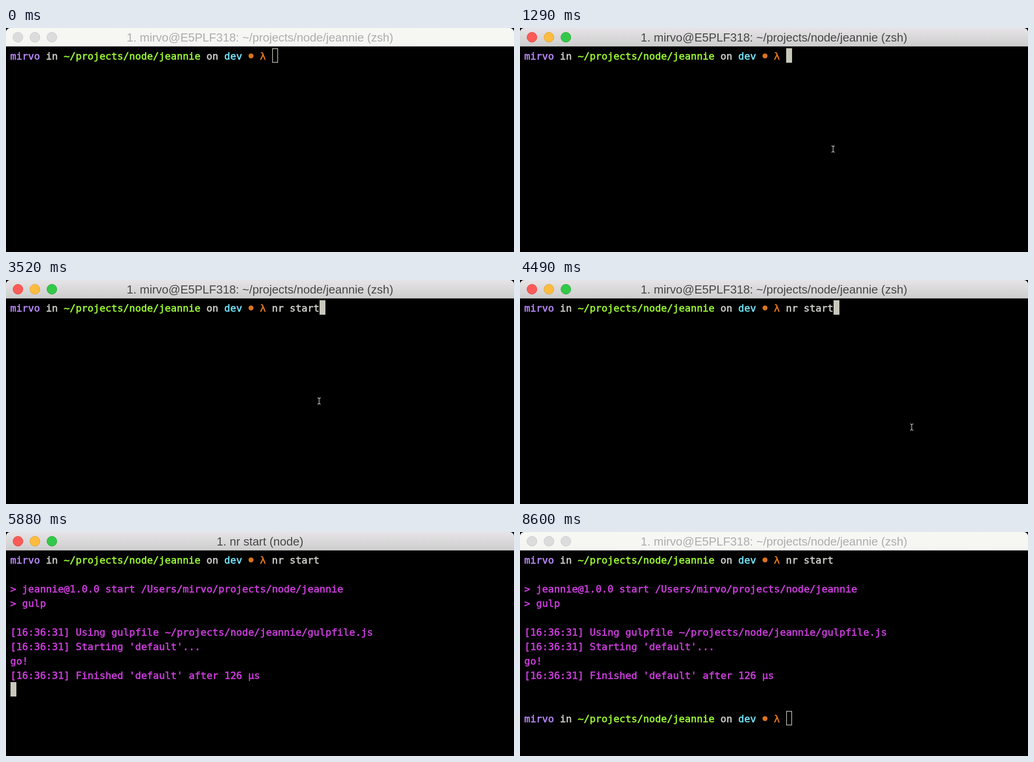
An HTML page with a canvas that plays this animation: 1126x497 px, repeating every 8.81 s.

```html
<!DOCTYPE html>
<html lang="en">
<head>
<meta charset="utf-8">
<title>Terminal</title>
<style>
html, body { margin: 0; width: 100%; height: 100%; overflow: hidden; background: #000; }
canvas { display: block; }
</style>
</head>
<body>
<canvas id="stage" width="1126" height="497"></canvas>
<script>
const ctx = document.getElementById('stage').getContext('2d');
const LOOP = 8810, CELL = 13.175, ROW = 32, LEFT = 9.5, TOP = 45;
const USER = 'mirvo', HOST = 'E5PLF318', PROJECT = '~/projects/node/jeannie', COMMAND = 'nr start';
const GREY = '#c9c9c4', ORANGE = '#dc741c', MAGENTA = '#c83cd8';

const FOCUS = 1250, ENTER = 5080, DONE = 5990, BLUR = 6360;
const keyTimes = [1990, 2120, 2250, 2400, 2550, 2690, 2850, 3020];

// [time, row, text]
const output = [
  [5530, 2, `> jeannie@1.0.0 start /Users/${USER}/projects/node/jeannie`],
  [5530, 3, '> gulp'],
  [5800, 5, `[16:36:31] Using gulpfile ${PROJECT}/gulpfile.js`],
  [5800, 6, "[16:36:31] Starting 'default'..."],
  [5800, 7, 'go!'],
  [5800, 8, "[16:36:31] Finished 'default' after 126 µs"]
];

// A thin outline gives the text its semi-bold weight.
function write(text, col, row, color) {
  const x = LEFT + col * CELL, y = TOP + 25 + row * ROW;
  ctx.fillStyle = ctx.strokeStyle = color;
  ctx.lineWidth = 0.8;
  ctx.lineJoin = 'round';
  ctx.fillText(text, x, y);
  ctx.strokeText(text, x, y);
}

function disc(x, y, r, fill, stroke) {
  ctx.beginPath();
  ctx.arc(x, y, r, 0, Math.PI * 2);
  ctx.fillStyle = fill;
  ctx.fill();
  if (stroke) {
    ctx.strokeStyle = stroke;
    ctx.lineWidth = 1;
    ctx.stroke();
  }
}

function titleBar(title, active) {
  const shade = ctx.createLinearGradient(0, 0, 0, 41);
  shade.addColorStop(0, active ? '#e6e4e6' : '#f7f7f4');
  shade.addColorStop(1, active ? '#cecdce' : '#f5f5f2');
  ctx.fillStyle = shade;
  ctx.beginPath();
  ctx.roundRect(0, 0, 1126, 41, [9, 9, 0, 0]);
  ctx.fill();
  ctx.fillStyle = active ? '#b4b4b4' : '#d2d2d2';
  ctx.fillRect(0, 40, 1126, 1);

  const lights = [['#fc5b57', '#df4744'], ['#fdbc40', '#de9f34'], ['#34c84a', '#27aa35']];
  lights.forEach(([fill, edge], i) =>
    disc(26.5 + i * 37.6, 20.5, 11, active ? fill : '#dcdcdc', active ? edge : '#c8c8c8'));

  ctx.font = '26px "Liberation Sans", Arial, sans-serif';
  ctx.textAlign = 'center';
  ctx.fillStyle = active ? '#474747' : '#adadad';
  ctx.fillText(title, 563, 30);
}

function prompt(row) {
  write(USER, 0, row, '#b483f4');
  write('in', 6, row, GREY);
  write(PROJECT, 9, row, '#98f232');
  write('on', 33, row, GREY);
  write('dev', 36, row, '#70def2');
  disc(LEFT + 40.5 * CELL, TOP + 17 + row * ROW, 5.5, ORANGE);
  write('λ', 42, row, ORANGE);
}

function cursor(col, row, active) {
  const x = Math.ceil(LEFT + col * CELL), y = TOP + row * ROW;
  ctx.fillStyle = ctx.strokeStyle = '#c8c8bc';
  if (active) {
    ctx.fillRect(x, y, 13, ROW);
  } else {
    ctx.lineWidth = 1.5;
    ctx.strokeRect(x + 0.75, y + 0.75, 11.5, ROW - 1.5);
  }
}

function ease(t, start, end) {
  const p = Math.min(1, Math.max(0, (t - start) / (end - start)));
  return p * p * (3 - 2 * p);
}

function pointer(t) {
  if (t < 730 || t > 4810) return;
  const enter = 1 - ease(t, 730, 1250), leave = ease(t, 4250, 4810);
  ctx.save();
  ctx.translate(694 + 440 * (enter + leave), 268.5 + 64 * enter + 146 * leave);
  ctx.strokeStyle = '#d8d8d8';
  ctx.lineWidth = 1.3;
  ctx.beginPath();
  ctx.moveTo(-3.5, -7);
  ctx.quadraticCurveTo(0, -7, 0, -4);
  ctx.quadraticCurveTo(0, -7, 3.5, -7);
  ctx.moveTo(0, -4);
  ctx.lineTo(0, 4);
  ctx.moveTo(-3.5, 7);
  ctx.quadraticCurveTo(0, 7, 0, 4);
  ctx.quadraticCurveTo(0, 7, 3.5, 7);
  ctx.stroke();
  ctx.restore();
}

function draw(t) {
  const active = t >= FOCUS && t < BLUR;
  const running = t >= ENTER && t < DONE;
  const typed = keyTimes.filter(time => t >= time).length;
  const lines = output.filter(([time]) => t >= time);

  ctx.fillStyle = '#000';
  ctx.fillRect(0, 0, 1126, 497);
  titleBar(running ? '1. nr start (node)' : `1. ${USER}@${HOST}: ${PROJECT} (zsh)`, active);

  ctx.font = '21.9px "DejaVu Sans Mono", monospace';
  ctx.textAlign = 'left';
  prompt(0);
  write(COMMAND.slice(0, typed), 44, 0, GREY);
  for (const [, row, text] of lines) write(text, 0, row, MAGENTA);

  if (t >= DONE) {
    prompt(11);
    cursor(44, 11, active);
  } else if (running) {
    cursor(0, lines.length ? lines[lines.length - 1][1] + 1 : 1, active);
  } else {
    cursor(44 + typed, 0, active);
  }
  pointer(t);
}

const start = performance.now();
function frame() {
  draw((performance.now() - start) % LOOP);
  requestAnimationFrame(frame);
}
frame();
</script>
</body>
</html>
```
